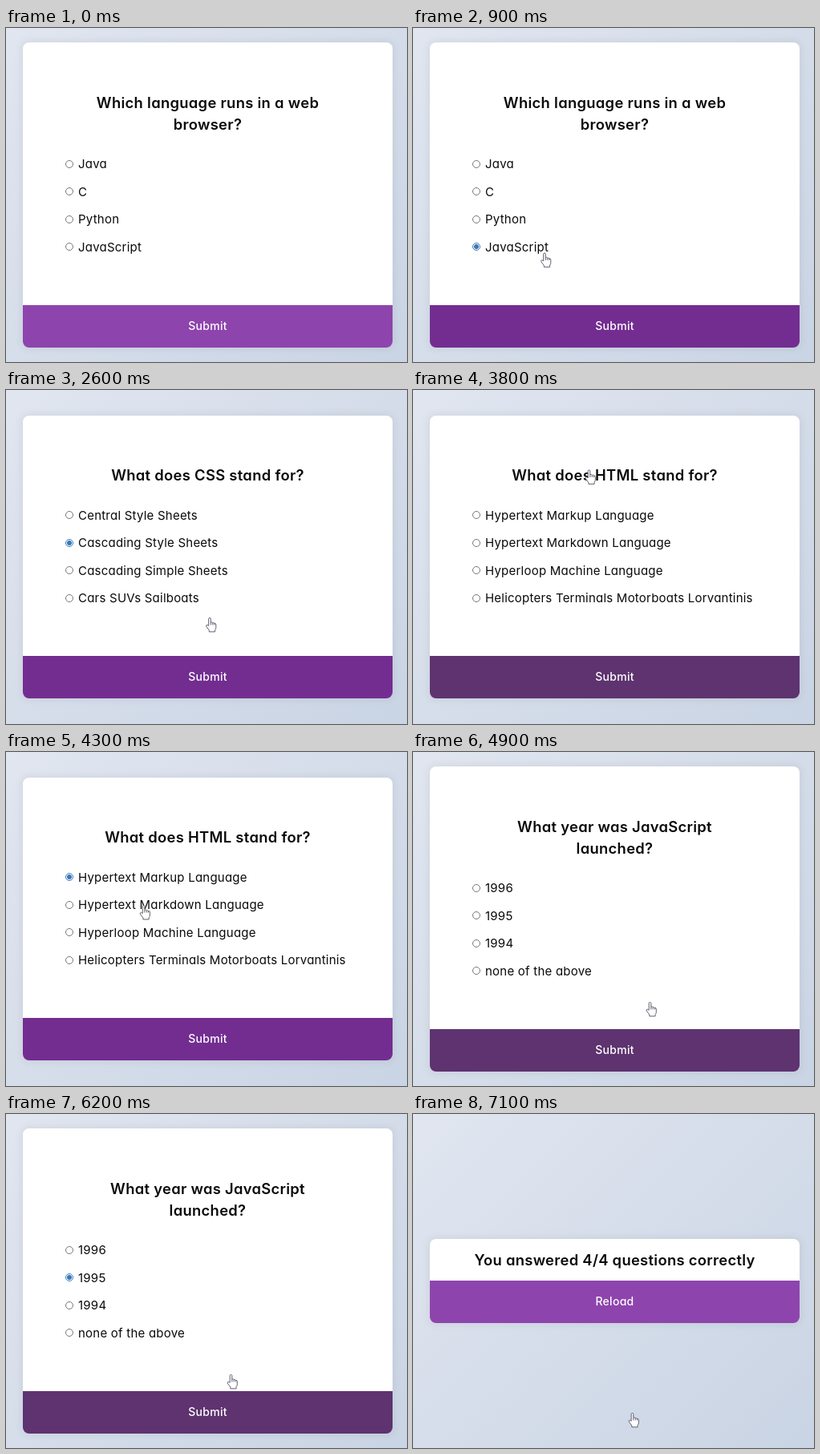
Animation of 500 by 417 pixels, one loop 7200 ms. Source, as an HTML page:

```html
<!DOCTYPE html>
<html lang="en">
<head>
<meta charset="utf-8">
<title>Quiz</title>
<style>
  html, body { margin: 0; width: 100%; height: 100%; overflow: hidden; }
  body {
    position: relative;
    display: grid; place-items: center;
    background: linear-gradient(135deg, #e1e6f0, #c9d4e4);
    font-family: Inter, "Open Sans", sans-serif;
    font-feature-settings: "cv11";
    color: #0a0a0a;
    white-space: nowrap;
  }
  .card {
    position: relative; left: 1.5px; width: 461px;
    border-radius: 7.7px; overflow: hidden;
    background: #fff;
    box-shadow: 0 0 8px 2px rgba(100, 100, 100, .1);
  }
  .body { padding: 49px; }
  .result .body { padding: 0; }
  h2 {
    margin: 0; padding: 12.3px 0;
    font-size: 18.4px; line-height: 27.2px; font-weight: 600;
    letter-spacing: .016em; text-align: center;
  }
  ul { list-style: none; margin: 0; padding: 0; display: flow-root; }
  .result ul { display: none; }
  li {
    display: flex; align-items: center;
    margin: 12.3px 0; height: 22.2px;
    font-size: 15px; letter-spacing: .015em;
  }
  i {
    box-sizing: border-box; width: 10px; height: 10px;
    margin: 0 6px 0 4px;
    border: 1px solid #777; border-radius: 50%;
  }
  .on i {
    border-color: #3b78b8;
    background: radial-gradient(circle, #3b78b8 2.7px, #fff 3.3px);
  }
  .submit {
    height: 52.8px; line-height: 52px; text-align: center;
    font-size: 14px; font-weight: 500; letter-spacing: .02em; color: #fff;
  }
  svg { position: absolute; left: 0; top: 0; overflow: visible; }
  svg path { fill: #fff; stroke: #555966; stroke-linejoin: round; }
  #hand { transform: scale(.94); }
</style>
</head>
<body>
<div class="card" id="card">
  <div class="body"><h2 id="title"></h2><ul id="list"></ul></div>
  <div class="submit" id="button"></div>
</div>
<svg id="cursor" width="14" height="20">
  <path id="arrow" d="M0 0V11.5L2.7 9 4.5 13.2 6.3 12.4 4.5 8.3H8.2Z"/>
  <g id="hand">
    <path d="M-1.4 10.5V1.2Q-1.4 0 0 0T1.4 1.2V6Q3.4 5.2 4 6.7 5.7 6 6.3 7.3 8.3 7 8.3 9V13Q8.3 15 7 16V18.5H-.7V16.5L-4.5 11.4Q-5 9.4-3.3 9.3Z"/>
    <path d="M1.4 6V9.5M4 6.7V9.5M6.3 7.3V9.5"/>
  </g>
</svg>
<script>
const LOOP = 7200, STEP = 100;
const NORMAL = '#8e44ad', HOVER = '#732d91', FOCUS = '#5e3370';
const $ = id => document.getElementById(id);

// pick: when the answer is chosen; look and back: where the cursor
// passes before and after choosing, as { t, x, y }.
const scenes = [
  { start: 0, pick: 700, answer: 3, look: { t: 300, x: 310, y: 440 },
    title: 'Which language runs in a web<br>browser?',
    options: ['Java', 'C', 'Python', 'JavaScript'] },
  { start: 1500, pick: 2200, answer: 1,
    look: { t: 1800, x: 187.5, y: 113.5 }, back: { t: 2600, x: 254, y: 284.5 },
    title: 'What does CSS stand for?',
    options: ['Central Style Sheets', 'Cascading Style Sheets',
              'Cascading Simple Sheets', 'Cars SUVs Sailboats'] },
  { start: 3200, pick: 4100, answer: 0, look: { t: 3800, x: 219.5, y: 100 },
    title: 'What does HTML stand for?',
    options: ['Hypertext Markup Language', 'Hypertext Markdown Language',
              'Hyperloop Machine Language',
              'Helicopters Terminals Motorboats Lorvantinis'] },
  { start: 4700, pick: 5800, answer: 1,
    look: { t: 4900, x: 295.5, y: 312.5 }, back: { t: 6200, x: 280.5, y: 325.5 },
    title: 'What year was JavaScript<br>launched?',
    options: ['1996', '1995', '1994', 'none of the above'] },
  { start: 6400, look: { t: 7100, x: 273.5, y: 373.5 },
    title: 'You answered 4/4 questions correctly', options: [] }
];

// Rest on the button, look, choose an option, return to the button.
const path = scenes.flatMap(({ start, pick, answer, look, back, title }) => {
  const rest = start ? { x: 278, y: 350 } : look;
  const stops = [{ ...rest, t: start }, { ...rest, t: start + 100 }, look];
  if (!pick) return stops;
  const option = { x: 145, y: (title.includes('<br>') ? 166 : 152) + 34.5 * answer };
  stops.push({ ...option, t: pick - 100 }, { ...option, t: pick + 100 });
  return back ? [...stops, back] : stops;
});

function cursorAt(t) {
  const next = path.findIndex(stop => stop.t > t);
  if (next < 0) return path[path.length - 1];
  const a = path[next - 1], b = path[next];
  const k = (t - a.t) / (b.t - a.t);
  return { x: a.x + (b.x - a.x) * k, y: a.y + (b.y - a.y) * k };
}

// The press keeps the button focused until the next answer is chosen.
function buttonColor(t, index) {
  const { pick } = scenes[index];
  if (!pick) return NORMAL;
  if (t < pick) return index ? FOCUS : NORMAL;
  const press = scenes[index + 1].start - 200;
  return t >= press ? FOCUS : t >= press - 400 ? HOVER : NORMAL;
}

let shown = -1;
function showScene(index) {
  if (index === shown) return;
  shown = index;
  const { title, options } = scenes[index];
  $('card').classList.toggle('result', !options.length);
  $('title').innerHTML = title;
  $('list').innerHTML = options.map(text => `<li><i></i>${text}</li>`).join('');
  $('button').textContent = options.length ? 'Submit' : 'Reload';
}

function draw(now) {
  const t = Math.floor(now % LOOP / STEP) * STEP;
  const index = scenes.filter(scene => scene.start <= t).length - 1;
  const { pick, answer } = scenes[index];
  showScene(index);
  [...$('list').children].forEach((li, i) =>
    li.classList.toggle('on', t >= pick && i === answer));
  $('button').style.background = buttonColor(t, index);

  const { x, y } = cursorAt(t);
  const overTitle = index === 1 && y < 130;
  $('cursor').style.transform = `translate(${x}px, ${y}px)`;
  $('arrow').style.display = overTitle ? '' : 'none';
  $('hand').style.display = overTitle ? 'none' : '';
}

const begin = performance.now();
function tick() {
  draw(performance.now() - begin);
  requestAnimationFrame(tick);
}
tick();
</script>
</body>
</html>
```
